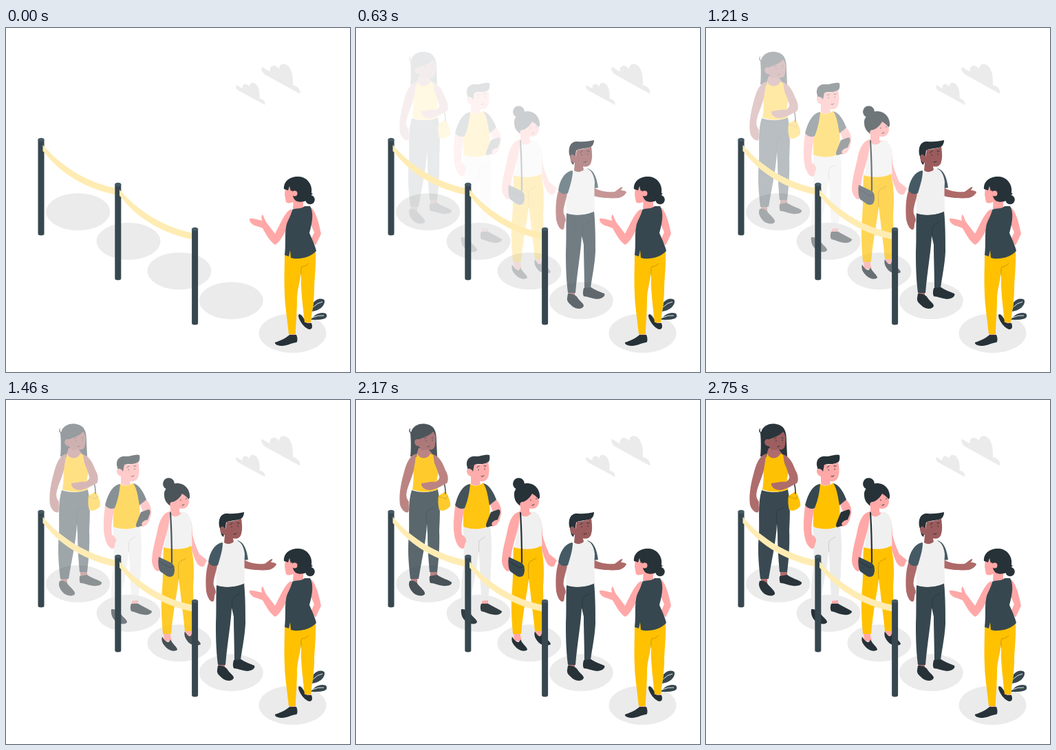
An HTML page that plays this animation: 500 px wide and 500 px high, repeating every 2.83 s.

```html
<!DOCTYPE html>
<html lang="en">
<head>
<meta charset="utf-8">
<title>Queue</title>
<style>
html, body { margin: 0; height: 100%; overflow: hidden; background: #fff; }
svg { display: block; width: 100vw; height: 100vh; }
.shade { fill: #ebebeb; }
.dark { fill: #37474f; }
.slate { fill: #455a64; }
.ink { fill: #263238; }
.gold { fill: #ffc100; }
.pale { fill: #ffecb3; }
.white { fill: #f0f0f0; }
.pink { fill: #ffa8a7; }
.brown { fill: #ad6a69; }
.deep { fill: #9c5c5d; }
.line { fill: none; stroke: #263238; stroke-linecap: round; }
.face { fill: none; stroke: #263238; stroke-linecap: round; stroke-width: 1; }
.fold { fill: none; stroke: #000; stroke-opacity: .2; }
</style>
</head>
<body>
<svg viewBox="0 0 500 500">
  <defs>
    <path id="cloud" d="M372 57C375 57 379 62 384 63C382 55 391 51 397 60C397 50 408 50 413 59C417 66 417 74 417 83C424 84 429 91 427 95.5L377 68C372 65 370 59 372 57Z"/>
    <g id="post">
      <path class="dark" d="M46.5 162V299A4.5 2.5 0 0 0 55.5 299V162Z"/>
      <ellipse class="slate" cx="51" cy="162.3" rx="4.5" ry="2.6"/>
    </g>
    <path id="rope" class="pale" d="M53.5 170C82 203 120 225 160 233V242.5C118 234 80 213 56 181L53.5 179Z"/>
  </defs>

  <g class="shade">
    <use href="#cloud"/>
    <use href="#cloud" transform="translate(54.3 41) scale(.754 .74)"/>
    <ellipse cx="104.8" cy="267.2" rx="46.5" ry="27"/>
    <ellipse cx="178" cy="310" rx="46.5" ry="27"/>
    <ellipse cx="252" cy="353.2" rx="46.5" ry="27"/>
    <ellipse cx="327.3" cy="396.2" rx="46.5" ry="27"/>
    <ellipse cx="416.5" cy="443.7" rx="49" ry="28.5"/>
  </g>

  <!-- Woman with long hair -->
  <g class="guest" data-fade="3000">
    <path class="ink" d="M80 47C82 38 92 33 102 35C114 37 117 45 117 60L118 82C106 86 90 84 79 82C80 70 80 60 79 48C76 46 77 42 79 41C78 44 79 46 80 47Z"/>
    <path class="brown" d="M80 257H89V267H80ZM108 247H118V258H108ZM91 70H104L114 82V102H87L88 79Z"/>
    <path class="dark" d="M81 131C92 135 108 135 119 130C123 150 122 170 121 190C122 210 120 235 118 250L107 250C105 230 104 210 104 195L103 180C102 205 96 230 91 260L79 260C76 235 75 215 77 195C78 170 75 150 81 131Z"/>
    <path class="fold" d="M103 180C102 168 102 163 105 160L113 156"/>
    <path class="gold" d="M89 78C92 86 104 87 108 78L113 80C119 88 121 95 120 105C117 115 117 122 119 130C108 135 92 134 82 130C84 118 84 108 83 98Z"/>
    <path class="brown" d="M88 78C78 80 73 92 69 108C65 122 62 140 64 152C66 160 72 165 76 163C78 158 76 154 77 148C74 144 72 140 74 132C77 120 84 108 85 95Z"/>
    <path class="gold" d="M120 139L130 133C134 139 138 148 137 154C133 160 126 162 121 160C119 153 119 145 120 139Z"/>
    <path class="fold" d="M120 140L131 144L133 138"/>
    <path class="line" stroke-width="1.6" d="M122 116C129 118 130 126 130 136"/>
    <path class="brown" d="M112 79C122 82 126 92 130 102C134 108 135 118 132 121C124 125 116 130 108 131C100 131 94 126 95 121C102 121 108 118 116 119C120 116 122 114 121 111C119 105 117 98 114 92Z"/>
    <path class="deep" d="M92 57C100 54 108 51 112 46C117 51 116 59 115 65C114 72 110 73 104 72L96 73L91 67C85 67 83 59 88 57Z"/>
    <path class="face" d="M102 59V60M111 58V59M100 56L102 55M110 55H112M104 68Q106 68 107 67"/>
    <path class="ink" d="M78 263C83 262 88 264 90 268C95 274 101 278 100 282C97 286 89 285 84 281C79 276 75 270 78 263ZM107 256L118 254C124 259 134 261 139 265C140 269 134 271 126 270C118 269 114 266 108 266C106 262 107 258 107 256Z"/>
  </g>

  <!-- Man with tablet -->
  <g class="guest" data-fade="2600">
    <path class="pink" d="M155 302H164V308H155ZM183 288H192V299H183Z"/>
    <path class="shade" d="M156 184C168 189 184 189 195 183C198 205 197 225 196 245C196 262 193 278 192 291L183 292C181 275 180 258 180 240L178 220C176 245 170 270 164 305L154 305C152 285 153 265 156 245C158 225 155 205 156 184Z"/>
    <path class="fold" stroke-width=".7" d="M179 221C178 210 178 206 181 203L188 199"/>
    <path class="pink" d="M195 152L204 145C210 151 213 160 210 170C208 178 204 183 197 184L194 180L200 165Z"/>
    <path class="gold" d="M166 122C172 126 178 125 184 121C192 123 194 132 194 145L195 182C184 189 166 189 156 184C156 165 157 140 160 128Z"/>
    <path class="pink" d="M144 154C142 170 141 185 143 197C145 208 150 217 156 216C159 213 157 210 160 206C161 202 158 198 154 196C152 186 155 170 158 157Z"/>
    <path class="dark" d="M166 122C154 124 148 138 144 153C148 158 154 159 158 157C163 145 165 133 166 122ZM185 121C194 123 201 136 204 145L194 153C192 143 191 130 185 121Z"/>
    <path class="ink" d="M196 163L207 159C210 160 210 163 209 166L203 181L191 185C188 184 189 181 190 178Z"/>
    <path class="pink" d="M197 180C198 177 202 174 207 174L205 181L199 184Z"/>
    <path class="ink" d="M161 95C160 86 166 81 174 82C182 82 188 78 194 80C195 86 194 90 190 92C182 94 176 92 173 94L171 104L166 109C162 106 163 100 161 95Z"/>
    <path class="pink" d="M172 94C180 94 188 93 192 90C194 98 194 106 192 112C190 118 184 119 180 118L181 122C177 125 171 125 167 122L167 111C161 110 159 101 163 100C166 99 169 102 170 104Z"/>
    <path class="face" d="M178 101V102M187 100V101M176 98L179 96M186 96L189 96M182 111Q184 112 186 110"/>
    <path class="ink" d="M153 304C159 304 164 306 166 310C170 316 176 319 176 323C173 327 165 326 160 322C155 318 152 312 153 304ZM182 296L192 296C198 300 206 303 212 307C212 311 206 313 200 312C192 311 188 308 182 307C180 303 181 299 182 296Z"/>
  </g>

  <!-- Woman with bun and shoulder bag -->
  <g class="guest" data-fade="2000">
    <path class="pink" d="M229 338H238L241 351L230 350ZM261 334H269L272 342L262 343ZM239 152H252V163L260 166V176H236V164L239 161Z"/>
    <path class="pink" d="M262 165C270 170 271 185 271 196C274 208 278 217 281 224C286 228 291 231 292 234C289 236 290 240 287 242C281 243 278 239 276 234C272 226 270 215 267 208Z"/>
    <path class="white" d="M237 164C242 172 252 171 256 162L263 164C270 172 271 185 270 195C270 203 271 209 270 213C258 220 240 218 230 214C233 202 234 190 234 180Z"/>
    <path class="gold" d="M229 214C242 218 258 218 269 212C273 230 274 250 272 270C273 300 271 320 270 336L260 336C258 315 255 295 253 275L251 260C249 280 243 305 240 340L228 340C226 315 225 300 227 275C229 250 228 230 229 214Z"/>
    <path class="fold" d="M251 260C250 242 250 237 254 234L262 230"/>
    <path class="pink" d="M238 162C228 164 223 175 220 190C217 205 212 220 212 235C213 243 218 250 222 249C224 244 226 240 226 234C224 228 227 218 230 206C234 192 238 180 238 162Z"/>
    <path class="line" stroke-width="2.2" d="M239 164C240 180 241 205 241 236"/>
    <path class="dark" d="M222 228L241 237C245 240 246 247 244 253C243 257 238 258 234 256L224 249C221 244 221 234 222 228Z"/>
    <path class="line" d="M222 234L238 244L244 242"/>
    <circle class="ink" cx="236.5" cy="121.8" r="8.5"/>
    <path class="ink" d="M230 138C229 128 240 121 250 121C262 122 268 132 267 142L264 146L255 139L244 153L239 154C233 150 230 145 230 138Z"/>
    <path class="pink" d="M240 156C237 153 238 147 243 148C248 146 253 142 256 136C260 139 266 142 266 148C265 156 259 160 251 157Z"/>
    <path class="face" d="M254 145V146M262 143V144M256 153Q258 153 259 152"/>
    <path class="ink" d="M227 344C232 352 237 355 239 348C242 355 249 359 249 363C246 366 238 365 233 360C228 355 225 350 227 344ZM260 336C264 344 269 346 270 339C274 346 283 351 283 355C279 358 270 357 266 353C261 348 258 342 260 336Z"/>
  </g>

  <!-- Man at the front -->
  <g class="guest" data-fade="1000">
    <path class="brown" d="M309 383H318V390H309ZM332 376H341V382H332Z"/>
    <path class="dark" d="M306 269C318 273 335 272 346 266C348 285 348 310 348 325C347 345 343 362 341 378L332 379C332 355 331 335 331 315L328 302C327 325 322 350 319 385L308 385C305 360 305 340 305 325C306 305 305 288 306 269Z"/>
    <path class="fold" d="M329 304C328 293 329 289 332 286L340 281"/>
    <path class="brown" d="M345 232C356 238 368 239 376 238C381 235 384 231 387 231C388 232 386 234 385 236C389 236 393 237 393 239C390 244 386 246 382 247C370 248 355 247 345 244Z"/>
    <path class="slate" d="M336 204C346 206 350 218 352 232L346 233C345 224 343 214 336 204Z"/>
    <path class="white" d="M315 207C322 211 330 209 334 204C341 205 346 213 347 224C346 240 347 255 347 266C335 273 315 273 306 269C306 250 304 235 306 222C307 214 310 209 315 207Z"/>
    <path class="brown" d="M294 237C290 250 290 265 291 278C293 288 297 294 301 293C304 290 302 286 304 282C306 279 304 274 302 270C300 262 306 250 307 240Z"/>
    <path class="slate" d="M314 207C302 210 296 222 294 236C298 242 304 242 308 240C311 230 315 218 315 208Z"/>
    <path class="ink" d="M310 184C308 172 313 164 322 165C332 166 340 164 346 163C346 169 343 173 338 174C330 176 324 175 320 178L318 192L316 199C311 196 313 190 310 184Z"/>
    <path class="deep" d="M321 177C330 176 338 175 342 172C343 180 344 188 342 194C341 200 336 203 330 201L331 206C327 210 320 210 317 207L318 196C312 196 309 187 313 184C316 183 318 186 319 188Z"/>
    <path class="face" d="M328 184V185M337 183V184M326 181L329 179M336 179H339M331 195Q333 195 335 194"/>
    <path class="ink" d="M308 386C314 386 320 388 322 392C325 397 331 400 331 404C329 409 321 409 315 405C310 400 306 398 307 392ZM331 378L342 377C347 381 356 384 361 386C363 390 357 394 350 394C342 393 336 390 331 390C329 386 330 382 331 378Z"/>
  </g>

  <!-- Barrier -->
  <use href="#post"/>
  <use href="#rope"/>
  <use href="#post" x="111.8" y="65"/>
  <use href="#rope" x="111.5" y="65"/>
  <use href="#post" x="223.6" y="130"/>

  <!-- Plant -->
  <path class="dark" d="M445 412L447 399C452 393 460 392 463 396C464 404 455 411 445 412ZM443 424C449 415 458 412 465 415C469 421 464 425 443 424Z"/>
  <path fill="none" stroke="#fff" stroke-width=".9" d="M446 406Q453 399 460 398M445 421Q454 417 462 418"/>

  <!-- Host -->
  <path class="pink" d="M442 260C450 264 455 284 458 299L450 316L443 308L448 297L440 278ZM418 247L432 250V261L424 265L417 263ZM412 442H421V450H412ZM435 425H443V432H435Z"/>
  <path class="ink" d="M426 416C430 416 434 424 437 429L444 429C446 434 445 438 441 438C434 437 425 424 425 418Z"/>
  <path class="gold" d="M405 330L413 323L450 324C451 345 448 365 448 380C448 395 445 410 443 428L434 428C432 408 430 395 429 375L429 355C427 370 423 383 423 394C423 415 421 430 421 445L411 445C409 425 405 400 405 385C404 365 405 348 405 330Z"/>
  <path class="fold" d="M429 360C429 354 428 350 430 347C435 347 438 344 440 342"/>
  <path class="pink" d="M415 263C407 266 403 276 391 299L378 282C376 279 375 274 373 271C371 273 371 276 372 280C366 279 359 276 354 277C353 281 358 287 365 288L373 291C378 300 384 311 391 315C399 312 408 292 415 279Z"/>
  <path class="dark" d="M416 264C422 261 428 264 434 259L442 259C447 268 446 280 441 298C444 305 449 315 451 324C443 333 430 336 418 335L414 334L413 323L411 332L405 330C407 312 405 300 407 290C408 280 414 275 416 264Z"/>
  <path class="pink" d="M406 232L405 242L407 253C411 256 415 254 419 252L426 246V230Z"/>
  <path class="ink" d="M404 234C403 222 414 215 426 216C438 217 446 228 444 240L446 241L442 244C440 252 428 255 421 251C418 248 416 244 416 236L414 237L412 230L410 236Z"/>
  <circle class="ink" cx="442" cy="249.5" r="6.8"/>
  <circle class="pink" cx="419.5" cy="240.5" r="4"/>
  <path class="ink" d="M412 446L422 446C424 450 424 456 422 457C414 458 408 462 402 462C396 462 390 460 391 457C397 455 407 451 412 446Z"/>
</svg>
<script>
const LOOP = 2830;
const guests = [...document.querySelectorAll('.guest')];
const easeInOut = p => (1 - Math.cos(Math.PI * p)) / 2;
const start = performance.now();

function draw() {
  const time = (performance.now() - start) % LOOP;
  for (const guest of guests) {
    guest.style.opacity = easeInOut(Math.min(1, time / guest.dataset.fade));
  }
  requestAnimationFrame(draw);
}
draw();
</script>
</body>
</html>
```
